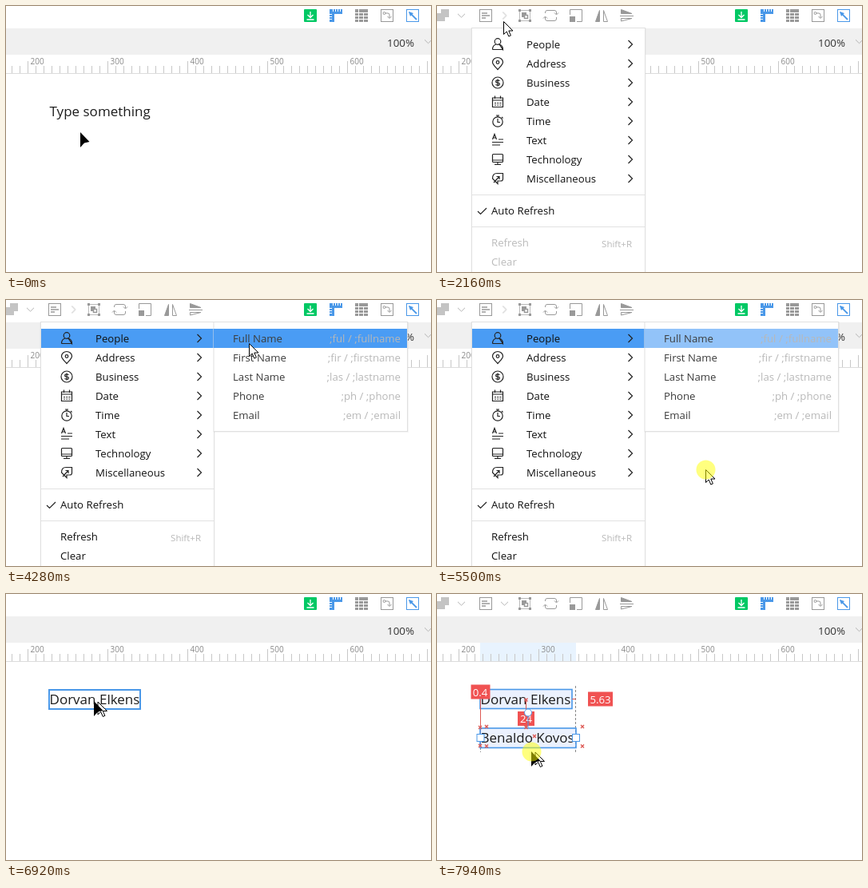
Write an HTML page that moves like this. It is 532 by 333 pixels and loops after 8000 ms.

```html
<!DOCTYPE html>
<html lang="en">
<head>
<meta charset="utf-8">
<title>Filling a text box from a menu</title>
<style>
html, body { margin: 0; width: 100%; height: 100%; overflow: hidden; background: #fff; }
svg { display: block; width: 100vw; height: 100vh; font: 13.2px "Open Sans", "Noto Sans", sans-serif; fill: none; }
text { fill: #111; }
.big { font-size: 17px; fill: #1c1c1c; }
.small { font-size: 10px; fill: #8a8a8a; }
.keys { fill: #b8b8b8; text-anchor: end; }
.sub text:not(.keys) { fill: #3c3c3c; }
.gray { stroke: #999; }
.grayfill { fill: #999; }
.chev { stroke: #b4b4b4; }
.blue { stroke: #4a98e8; }
.dark { stroke: #222; stroke-width: 1.2; }
.red { stroke: #dd5a55; }
.tag rect { fill: #f05252; }
.tag text { fill: #fff; text-anchor: middle; font-weight: 500; }
.tint { fill: #3c78f0; fill-opacity: .1; }

/* steps */
.tools, .band, .prompt, .name, .selA, .selB, .hoverA, .hoverB, .arrow, .white, .copyArrow, .ring,
.people, .subOn, .copy, .guides, .late, .toggle, .full {
  animation: 8s step-end infinite;
}
.tools { animation-name: tools; }
.band { animation-name: band; }
.prompt { animation-name: prompt; }
.name { animation-name: name; }
.selA { animation-name: selA; }
.selB { animation-name: selB; }
.hoverA { animation-name: hoverA; }
.hoverB { animation-name: hoverB; }
.arrow { animation-name: arrow; }
.white { animation-name: white; }
.copyArrow { animation-name: copyArrow; }
.ring { animation-name: ring; }
.people { animation-name: people; }
.subOn { animation-name: subOn; }
.full { animation-name: full; }
.copy { animation-name: copy; }
.guides { animation-name: guides; }
.late { animation-name: late; }
.toggle { transform-origin: 84.5px 12px; animation-name: toggle; }

/* smooth motion */
.menu { animation: menu 8s linear infinite; }
.cursor { animation: move 8s ease-in-out infinite; }
.drag { animation: drag 8s ease-in-out infinite; }

@keyframes tools { 0%, 72% { visibility: hidden } 8%, 90.625%, 100% { visibility: visible } }
@keyframes band {
  0%, 72% { width: 0 }
  8% { width: 129px }
  43.75%, 90.625% { width: 115px }
  95.5%, 100% { width: 120px }
}
@keyframes prompt { 0% { visibility: visible } 43.75%, 100% { visibility: hidden } }
@keyframes name { 0% { visibility: hidden } 43.75%, 100% { visibility: visible } }
@keyframes selA { 0%, 43.75%, 100% { visibility: hidden } 8% { visibility: visible } }
@keyframes selB { 0%, 75.5%, 95.4%, 100% { visibility: hidden } 43.75%, 90.625% { visibility: visible } }
@keyframes hoverA { 0%, 14.8%, 100% { visibility: hidden } 7.4% { visibility: visible } }
@keyframes hoverB { 0%, 95.4%, 100% { visibility: hidden } 83.7% { visibility: visible } }
@keyframes arrow { 0%, 75.5% { visibility: visible } 15.8%, 85.5%, 100% { visibility: hidden } }
@keyframes white { 0%, 75.5%, 100% { visibility: hidden } 15.8% { visibility: visible } }
@keyframes copyArrow { 0% { visibility: hidden } 85.5%, 100% { visibility: visible } }
@keyframes ring {
  0%, 10.625%, 23.5%, 45.25%, 76.125% { visibility: hidden }
  7%, 20.5%, 43%, 68.75%, 89.5%, 100% { visibility: visible }
}
@keyframes people { 0% { visibility: hidden } 28.6%, 100% { visibility: visible } }
@keyframes subOn { 0%, 70%, 100% { visibility: hidden } 29.3% { visibility: visible } }
@keyframes full { 0% { fill: #fff } 36.8% { fill: #4a9cf4 } 61.2%, 100% { fill: #92c3f9 } }
@keyframes copy { 0% { visibility: hidden } 95.4%, 100% { visibility: visible } }
@keyframes guides { 0% { visibility: hidden } 98.3%, 100% { visibility: visible } }
@keyframes late { 0% { fill: #bbb } 43.75%, 100% { fill: #111 } }
@keyframes toggle { 0%, 69.5%, 100% { transform: none } 21.5% { transform: rotate(-90deg) } }
@keyframes menu {
  0%, 21.49% { opacity: 0 }
  21.5%, 69.1% { opacity: 1 }
  69.75%, 100% { opacity: 0 }
}
@keyframes move {
  0%, 2.875% { transform: translate(93px, 158px) }
  4.875%, 13.375% { transform: translate(86.5px, 129px) }
  18.25%, 27.1% { transform: translate(83px, 19px) }
  29.875%, 33.25% { transform: translate(99px, 48px) }
  38.5%, 53.5% { transform: translate(304px, 54px) }
  53.6%, 60.25% { transform: translate(304px, 55px) }
  66.5%, 77.875% { transform: translate(336px, 212px) }
  86.5%, 87.5% { transform: translate(110px, 134px) }
  87.75%, 95.125% { transform: translate(110px, 136px) }
  99.25%, 100% { transform: translate(118px, 197px) }
}
@keyframes drag {
  0%, 95.125% { transform: none }
  99.25%, 100% { transform: translate(0, 48px) }
}
</style>
</head>
<body>
<svg viewBox="0 0 532 333">
  <defs>
    <path id="down" d="M-4.5-2.2L0 2.2 4.5-2.2"/>
    <path id="next" d="M-2.5-5L2.5 0-2.5 5"/>
    <path id="cross" d="M-2-2L2 2M2-2L-2 2" stroke-width="1.4"/>
    <rect id="grip" x="-4.5" y="-4.5" width="9" height="9" fill="#fff"/>
    <g id="spin"><path d="M0 5V19"/><circle r="4.5" fill="#fff"/></g>
    <path id="pointer" d="M.5.5V16.5L4.2 13 6.8 19 9.4 17.9 6.8 12H12Z" fill="#fff" stroke="#000"/>
    <path id="wedge" d="M0 0V19L5 13.5 11.5 12Z" fill="#000"/>
  </defs>

  <!-- bars -->
  <rect width="532" height="333" fill="#fff"/>
  <rect y="28" width="532" height="33" fill="#f0f0f0"/>
  <text x="477" y="51" style="fill:#333;font-size:13.4px">100%</text>
  <use href="#down" x="528.5" y="44.5" class="chev"/>

  <!-- ruler -->
  <rect class="band" x="54" y="61" width="0" height="23" fill="#e8f3fe"/>
  <g stroke="#c8c8c8">
    <path d="M-3 79.5H532" stroke-width="9" stroke-dasharray="1 9"/>
    <path d="M27 76.5H532" stroke-width="15" stroke-dasharray="1 99"/>
    <path d="M0 84.5H532" stroke="#dcdcdc"/>
  </g>
  <text class="small" y="73"><tspan x="30.5">200</tspan><tspan x="130.5">300</tspan><tspan x="230.5">400</tspan><tspan x="330.5">500</tspan><tspan x="430.5">600</tspan></text>

  <!-- fixed tools -->
  <rect x="373" y="4" width="16" height="16" rx="1" fill="#00c864"/>
  <path d="M381 7V14M377.5 11L381 14.5 384.5 11M376.5 17H385.5" stroke="#fff" stroke-width="1.3"/>
  <path d="M405 4H421V10H411V20H405Z" fill="#4a98e8"/>
  <path d="M409.5 4V7M412.5 4V7M415.5 4V7M418.5 4V7M405 10.5H408M405 13.5H408M405 16.5H408" stroke="#fff"/>
  <path class="grayfill" d="M437 4h4v4h-4zM442 4h11v4h-11zM437 9h4v3h-4zM442 9h5v3h-5zM448 9h5v3h-5zM437 13h4v3h-4zM442 13h5v3h-5zM448 13h5v3h-5zM437 17h4v3h-4zM442 17h5v3h-5zM448 17h5v3h-5z"/>
  <g class="gray">
    <rect x="469.5" y="4.500" width="15" height="15"/>
    <circle cx="473.5" cy="9" r="1.500"/>
    <path d="M475 9H478Q480 9 480 11V15M477.500 13L480 15.500 482.500 13"/>
  </g>
  <g class="blue">
    <rect x="501.5" y="4.500" width="15" height="15"/>
    <path d="M505 8L514 17" stroke-width="1.800"/>
    <path d="M504 7L510 9 506 13Z" fill="#4a98e8" stroke="none"/>
  </g>

  <!-- tools for a chosen shape -->
  <g class="tools">
    <path d="M5 4H15V14H10V19H-1V9H5Z" fill="#c4c4c4"/>
    <use href="#down" x="30.5" y="12" class="chev"/>
    <g class="gray">
      <rect x="53.5" y="4.500" width="15" height="15"/>
      <path d="M56 9H63M56 12H66M56 15H61" stroke-width="1.500"/>
    </g>
    <g class="toggle"><use href="#down" x="84.5" y="12" class="chev"/></g>
    <g class="gray">
      <rect x="103.5" y="5.500" width="13" height="13" stroke="#bbb"/>
      <path class="grayfill" stroke="none" d="M102 4h3v3h-3zM115 4h3v3h-3zM102 17h3v3h-3zM115 17h3v3h-3zM106 8h6v6h-6z"/>
      <rect x="109.500" y="11.500" width="4" height="4" fill="#fff" stroke-width="1.500"/>
      <path d="M135.500 9V8Q135.500 5.500 138 5.500H147Q149.500 5.500 149.500 8V10M149.500 14V16Q149.500 18.500 147 18.500H138Q135.500 18.500 135.500 16V14M147 8.500L149.500 11 152 8.500M133 15.500L135.500 13 138 15.500"/>
      <path d="M166.500 11V4.500H181.500V19.500H175"/>
      <rect x="166" y="13" width="7" height="7" class="grayfill" stroke="none"/>
      <path class="grayfill" d="M203.500 5.500V19.500H198.500Z"/>
      <path d="M208.500 5.500V19.500H213.500Z"/>
      <path class="grayfill" d="M230.500 4.500V9.500H244Z"/>
      <path d="M229 12.500H246M230.500 19V15.500H244Z"/>
    </g>
  </g>

  <!-- canvas -->
  <g class="hoverA"><rect x="54" y="120" width="129" height="24" class="blue" stroke-width="2"/></g>
  <g class="hoverB"><rect x="54" y="120" width="114" height="24" class="blue" stroke-width="2"/></g>
  <g class="copy"><rect x="54" y="119.5" width="115" height="24" class="blue tint" stroke-width="1.600"/></g>
  <text x="54.5" y="138" class="big prompt">Type something</text>
  <text x="54.5" y="138" class="big name">Dorvan Elkens</text>
  <g class="selA blue">
    <rect x="54" y="120" width="129" height="24"/>
    <use href="#spin" x="118.5" y="100.5"/><use href="#grip" x="54.5" y="132"/><use href="#grip" x="183" y="132"/>
  </g>
  <g class="selB blue">
    <rect x="54" y="120" width="114" height="24"/>
    <use href="#spin" x="111.5" y="100.5"/><use href="#grip" x="54.5" y="132"/><use href="#grip" x="168" y="132"/>
  </g>

  <g class="guides">
    <path d="M173.500 115V198M54.500 192V198" stroke="#888" stroke-dasharray="3 2"/>
    <path class="red" d="M54.500 132V190M111.500 132V168M169 131.500H174"/>
    <g class="tag">
      <rect x="101" y="147" width="21" height="18"/><text x="111.500" y="161">24</text>
    </g>
  </g>
  <g class="copy"><g class="drag">
    <rect x="54" y="120" width="120" height="24.500" class="blue tint" stroke-width="1.600"/>
    <text x="54.5" y="138" class="big">Benaldo Kovos</text>
    <g class="blue"><use href="#spin" x="114" y="100.5"/><use href="#grip" x="54.5" y="132"/><use href="#grip" x="174" y="132"/></g>
  </g></g>
  <g class="guides">
    <g class="red">
      <use href="#cross" x="54" y="167"/><use href="#cross" x="62" y="166"/><use href="#cross" x="182" y="166"/>
      <use href="#cross" x="54" y="190"/><use href="#cross" x="62" y="190.5"/><use href="#cross" x="182" y="190.5"/>
      <use href="#cross" x="111.5" y="132.5"/><use href="#cross" x="111.5" y="167"/><use href="#cross" x="122" y="178"/>
    </g>
    <g class="tag">
      <rect x="42.5" y="113.5" width="24" height="18"/><text x="54" y="127.500">0.4</text>
      <rect x="189" y="122.5" width="31" height="18"/><text x="204.500" y="136.500">5.63</text>
    </g>
  </g>

  <!-- menus -->
  <g class="menu">
    <rect x="42.5" y="27" width="219" height="320" fill="#000" fill-opacity=".04"/>
    <rect x="43.5" y="27.500" width="217" height="320" fill="#fff" stroke="#e0e0e0"/>
    <g class="people"><rect x="44" y="36" width="216" height="24" fill="#4a9cf4"/></g>
    <text><tspan x="112" y="53">People</tspan><tspan x="112" y="77">Address</tspan><tspan x="112" y="101">Business</tspan><tspan x="112" y="125">Date</tspan><tspan x="112" y="149">Time</tspan><tspan x="112" y="173">Text</tspan><tspan x="112" y="197">Technology</tspan><tspan x="112" y="221">Miscellaneous</tspan><tspan x="68" y="261">Auto Refresh</tspan></text>
    <text class="late"><tspan x="68" y="301">Refresh</tspan><tspan x="68" y="325">Clear</tspan></text>
    <text class="keys" x="244" y="302" style="font-size:11.5px">Shift+R</text>
    <path d="M44 236.500H260M44 276.500H260" stroke="#e2e2e2"/>
    <g class="dark">
      <use href="#next" x="242" y="48"/><use href="#next" x="242" y="72"/><use href="#next" x="242" y="96"/><use href="#next" x="242" y="120"/>
      <use href="#next" x="242" y="144"/><use href="#next" x="242" y="168"/><use href="#next" x="242" y="192"/><use href="#next" x="242" y="216"/>
      <path d="M51 257L54.500 260.500 62 253"/>
      <circle cx="76" cy="44.500" r="3.800"/>
      <path d="M69.500 54.500C69.500 50.500 72 48.500 74 48M78 48C80 48.500 82.500 50.500 82.500 54.500Z M69.500 54.500H82.500"/>
      <path d="M76 79.500C72 75 69.500 73 69.500 70.500A6.500 6 0 0 1 82.500 70.500C82.500 73 80 75 76 79.500Z"/>
      <circle cx="76" cy="70.500" r="1.800"/>
      <circle cx="76" cy="96" r="7"/>
      <path d="M78.300 94Q78 92.800 76 92.800 73.700 92.800 73.700 94.400T76 96 78.300 97.700 76 99.200 73.700 98M76 91.500V100.500"/>
      <path d="M69.500 115H82.500V126.500H69.500ZM72.500 112.500V116M79.500 112.500V116M69.500 118H82.500"/>
      <path d="M72 121.500H80.500M72 124H80.500" stroke-dasharray="2 1.200"/>
      <circle cx="76" cy="145" r="6.200"/>
      <path d="M76 141V145.500H79M74 137H78M76 137V139M81 139L82.500 140.500"/>
      <path d="M69.500 167L72 160.500 74.500 167M70.300 165H73.700M77 167H83M69 170.500H83M69 174H79"/>
      <rect x="69.500" y="185.500" width="13" height="10" rx="1"/>
      <path d="M69.500 193H82.500M76 195.500V198.500M72 198.500H80"/>
      <path d="M75 209.500H82.500V216.500Q82.500 219 80 219H76V222.500L69.500 216Q69.500 209.500 75 209.500ZM71 221L78 213.500M74.500 213.500H78V217"/>
    </g>
    <g class="sub subOn">
      <rect x="260" y="27" width="244" height="139" fill="#000" fill-opacity=".04"/>
      <rect x="260" y="27.500" width="242.500" height="137" fill="#fff" stroke="#e0e0e0"/>
      <rect class="full" x="260" y="36" width="242" height="24"/>
      <text><tspan x="284" y="53">Full Name</tspan><tspan x="284" y="77">First Name</tspan><tspan x="284" y="101">Last Name</tspan><tspan x="284" y="125">Phone</tspan><tspan x="284" y="149">Email</tspan></text>
      <text class="keys"><tspan x="494" y="53">;ful / ;fullname</tspan><tspan x="494" y="77">;fir / ;firstname</tspan><tspan x="494" y="101">;las / ;lastname</tspan><tspan x="494" y="125">;ph / ;phone</tspan><tspan x="494" y="149">;em / ;email</tspan></text>
    </g>
  </g>

  <g class="cursor">
    <g class="arrow"><use href="#wedge"/></g>
    <g class="white"><use href="#pointer"/></g>
    <g class="copyArrow"><use href="#pointer" x="4.5" y=".5"/><use href="#wedge"/></g>
    <g class="ring"><circle cx=".5" cy=".5" r="12" fill="#ff0" fill-opacity=".5"/></g>
  </g>
</svg>
</body>
</html>
```
